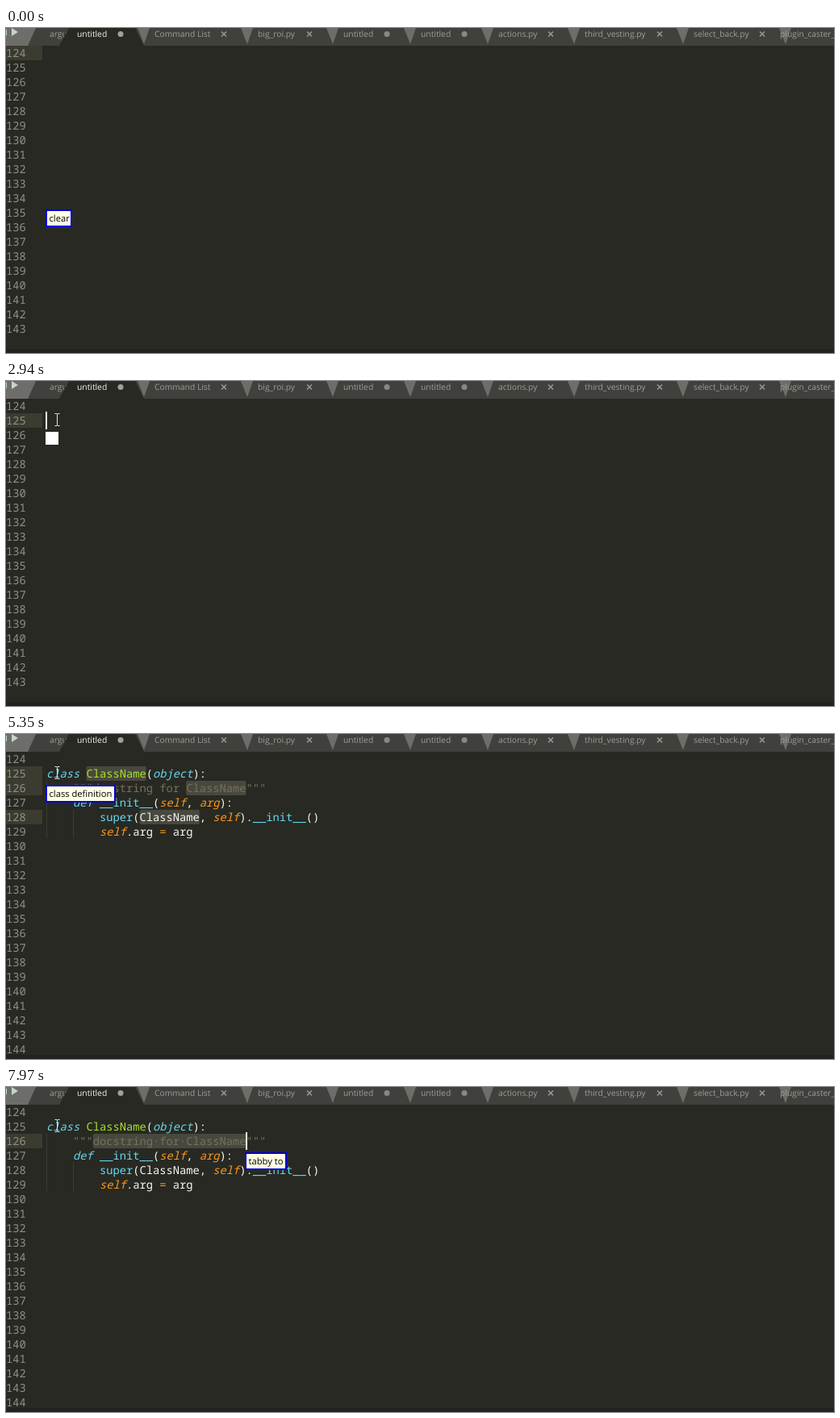
These frames come from a looping animation (1026 by 403 pixels, 8 s). An HTML page:

```html
<!DOCTYPE html>
<html lang="en">
<head>
<meta charset="utf-8">
<title>Editor snippet by voice</title>
<style>
html, body { margin: 0; width: 100%; height: 100%; overflow: hidden; background: #282923; }
svg { display: block; text-rendering: geometricPrecision; }
text { white-space: pre; }
.ui { font: 10.3px "Open Sans", "Noto Sans", sans-serif; fill: #9c9d99; }
.on { fill: #f4f4f0; }
.tip { font: 11.2px "Open Sans", "Noto Sans", sans-serif; fill: #000; }
.code { font: 13.75px "Noto Sans Mono", "DejaVu Sans Mono", monospace; fill: #f8f8f2; }
.num { fill: #8f908a; }
.c { fill: #66d9ef; } .C { fill: #66d9ef; font-style: italic; }
.g { fill: #a6e22e; }
.o { fill: #fd971f; } .O { fill: #fd971f; font-style: italic; }
.d { fill: #75715e; }
.guide { stroke: #4a4b45; stroke-dasharray: 1 1; }
.gutter { fill: #3c3b30; }
.sel { fill: #49483e; }
</style>
</head>
<body>
<svg id="stage" width="1026" height="403" viewBox="0 0 1026 403"></svg>
<script>
const LOOP = 8000, COL = 8.25, LEFT = 50, ROW = 18;
const top0 = line => 22 + (line - 124) * ROW;
const colX = col => LEFT + col * COL;
const rect = (x, y, w, h, rest) => `<rect x="${x}" y="${y}" width="${w}" height="${h}" ${rest}/>`;
const text = (x, y, cls, s) => `<text x="${x}" y="${y}" class="${cls}">${s}</text>`;
const poly = (points, fill) => `<polygon points="${points}" fill="${fill}"/>`;

// Tab bar: [label, label x, marker x, modified]
const tabs = [
  ['untitled', 88, 142, true], ['Command List', 184, 270], ['big_roi.py', 312, 376],
  ['untitled', 418, 472, true], ['untitled', 514, 568, true], ['actions.py', 610, 675],
  ['third_vesting.py', 717, 810], ['select_back.py', 852, 937]
];

function tabBar() {
  let s = rect(0, 0, 1026, 22, 'fill="#40413c"')
    + poly('0,0 37,0 27,22 0,22', '#6d6e69')
    + poly('7,0 15,5 7,10', '#c6d4cc') + rect(0, 2, 1, 7, 'fill="#c6d4cc"')
    + text(54, 11, 'ui', 'argu')
    + poly('78,0 160,0 171,22 66,22', '#282923');
  tabs.forEach(([label, x, mark, modified], i) => {
    const end = mark + 29;
    s += poly(`${end - 8},0 ${end + 7},0 ${end},20`, '#6d6e69') + text(x, 11, i ? 'ui' : 'ui on', label);
    s += modified
      ? `<circle cx="${mark}" cy="7.5" r="3.5" fill="${i ? '#888984' : '#a0a19c'}"/>`
      : `<path d="M${mark - 3} 4.5l6 6m0-6l-6 6" stroke="#999a95" stroke-width="1.5"/>`;
  });
  return s + text(959, 11, 'ui', 'plugin_caster_');
}

const lineNumber = n => text(0, top0(n) + 14, 'code num', n);
const gutter = n => rect(0, top0(n), 45, ROW, 'class="gutter"');
const select = (line, from, to) =>
  rect(colX(from), top0(line), (to - from) * COL, ROW, 'rx="2" class="sel"');
const caret = (line, col) => rect(Math.floor(colX(col)) - (col ? 0 : 1), top0(line) - 2, 2, 22, 'fill="#f8f8f0"');

// Each row: line, first column, then "style|text" pieces
const source = [
  [125, 0, 'C|class', 'g| ClassName', 'w|(', 'C|object', 'w|):'],
  [126, 4, 'd|"""docstring for ClassName"""'],
  [127, 4, 'C|def', 'c| __init__', 'w|(', 'O|self', 'w|,', 'O| arg', 'w|):'],
  [128, 8, 'c|super', 'w|(ClassName,', 'O| self', 'w|).', 'c|__init__', 'w|()'],
  [129, 8, 'O|self', 'w|.arg', 'o| =', 'w| arg']
];

function codeRow([line, col, ...pieces]) {
  return pieces.map(piece => {
    const [style, s] = piece.split('|'), gap = s.length - s.trimStart().length;
    const out = text(colX(col + gap), top0(line) + 14, 'code ' + style, s.trimStart());
    col += s.length;
    return out;
  }).join('');
}

const guide = (x, from) =>
  `<line class="guide" x1="${x}" x2="${x}" y1="${top0(from)}" y2="${top0(130)}"/>`;
const body = guide(50.5, 126) + guide(83.5, 128) + source.map(codeRow).join('');
const base = rect(0, 0, 1026, 403, 'fill="#282923"') + rect(0, 398, 1026, 5, 'fill="#222320"') + tabBar();
const numbers = Array.from({length: 20}, (_, i) => lineNumber(124 + i)).join('');

// Editor states: start, highlighted lines, selections, carets, snippet shown
const name = [[125, 6, 15], [126, 21, 30], [128, 14, 23]];
const editor = [
  [0, [124], [], [], false],
  [1545, [125], [], [[125, 0]], false],
  [3790, [125, 126, 128], name, name.map(([line, , to]) => [line, to]), true],
  [6430, [126], [[126, 7, 30]], [[126, 30]], true]
];

// Voice status: start, label (empty label is the icon), x, y, width
const status = [
  [0, 'clear', 49, 225, 33], [2700], [2940, '', 49, 63],
  [3640, 'class definition', 49, 63, 87], [5720, 'class definition', 239, 117, 87],
  [5880, '', 239, 117], [6270, 'tabby to', 239, 117, 52], [7970, 'tabby to', 296, 81, 52]
];

// Times at which the caret starts and ends a fade, alternating out and in
const fades = [
  [1990, 2160, 0], [2630, 2780, 1], [3060, 3320, 0], [3600, 3789, 1], [4060, 4420, 0],
  [4800, 4960, 1], [5230, 5350, 0], [5700, 5900, 1], [6120, 6270, 0], [6430, 6431, 1],
  [6860, 7140, 0], [7590, 7740, 1]
];

const at = (list, t) => list.filter(item => item[0] <= t).pop();
const clamp = v => Math.max(0, Math.min(1, v));

function caretAlpha(t) {
  const fade = at(fades, t);
  if (!fade) return 1;
  const p = clamp((t - fade[0]) / (fade[1] - fade[0]));
  return fade[2] ? p : 1 - p;
}

function statusBox(t) {
  const [, label, x, y, w] = at(status, t);
  if (label === undefined) return '';
  if (!label) return rect(x, y, 16, 16, 'fill="#fff"');
  return rect(x + 1, y + 1, w - 2, 20, 'fill="#ffffe6" stroke="#0000dc" stroke-width="2"')
    + text(x + 4.5, y + 15, 'tip', label);
}

// The pointer advances in discrete steps, like a screen capture
function pointer(t) {
  if (t < 70) return '';
  const step = (start, end, n) => clamp((Math.floor((t - start) / (end - start) * (n - 1) + .001) + 1) / n);
  let x, y;
  if (t < 690) {
    const p = 1 - (1 - clamp(Math.floor((t - 70) / 78) / 5)) ** 2;
    x = 791 - 628 * p;
    y = 379 - 266 * p;
  } else {
    const p = step(690, 1150, 7), e = p * p * (3 - 2 * p);
    x = 163 - 100 * e;
    y = 113 - 65 * e;
  }
  x = Math.round(x) + .5;
  y = Math.round(y);
  return `<path d="M${x - 3} ${y - 7.5}h2.5l.5 .5l.5 -.5h2.5M${x} ${y - 7}v14M${x - 3} ${y + 7.5}h2.5l.5 -.5l.5 .5h2.5" fill="none" stroke="#e4e4df"/>`;
}

const stage = document.getElementById('stage');
const began = performance.now();

function draw(now) {
  const t = Math.max(0, now - began) % LOOP;
  const [, lines, selections, carets, filled] = at(editor, t);
  stage.innerHTML = base + lines.map(gutter).join('') + numbers
    + selections.map(s => select(...s)).join('')
    + (filled ? lineNumber(144) + body : '')
    + (t >= 6430 ? [16, 20].map(c => text(colX(c), top0(126) + 14, 'code d', '·')).join('') : '')
    + `<g opacity="${caretAlpha(t)}">${carets.map(c => caret(...c)).join('')}</g>`
    + statusBox(t) + pointer(t);
  requestAnimationFrame(draw);
}
draw(began);
</script>
</body>
</html>
```
